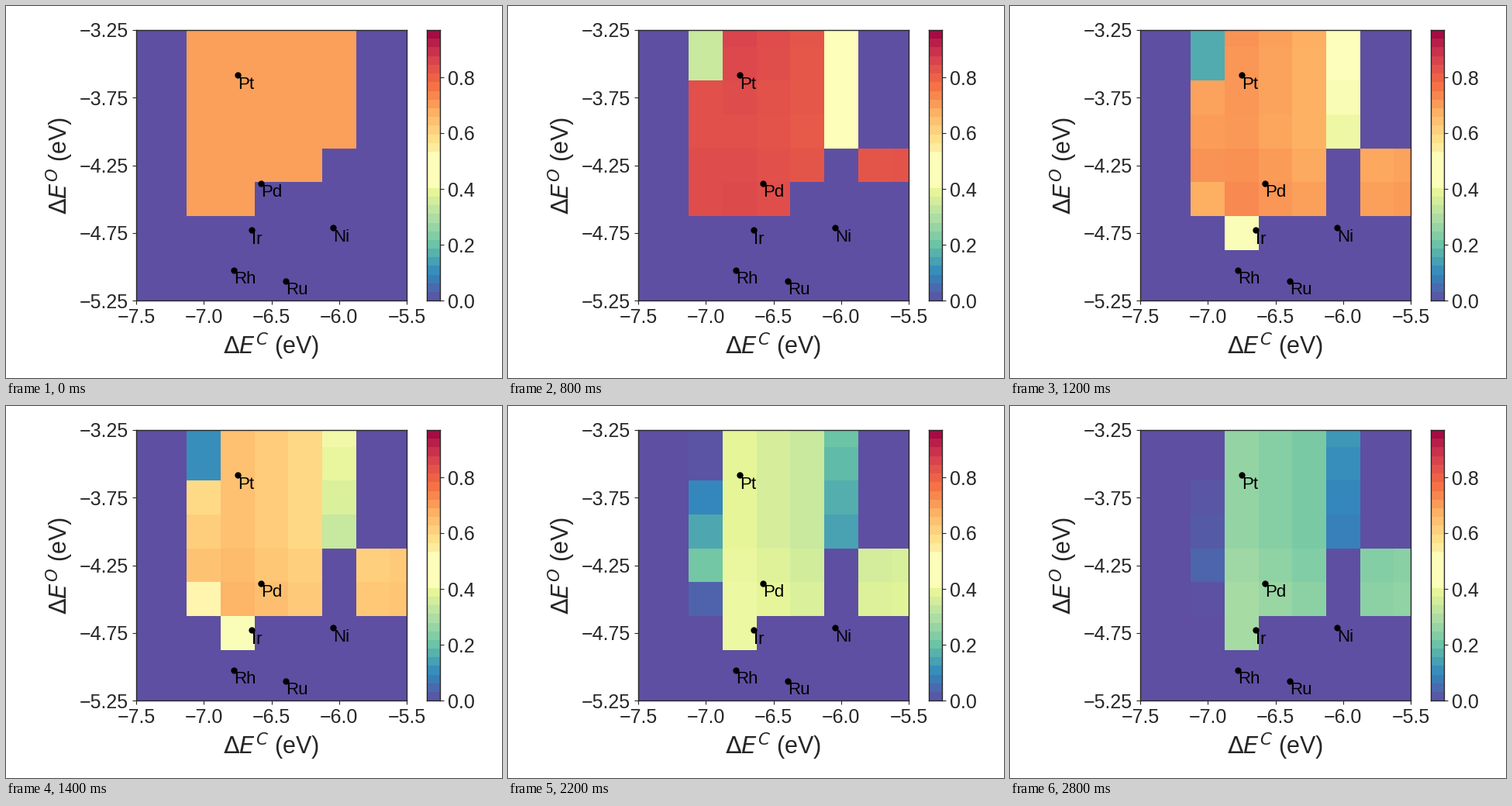
Animation of 640x480 px, one loop 3 s. Source, as a matplotlib script:

```python
import numpy as np
import matplotlib.pyplot as plt
from matplotlib.animation import FuncAnimation

W, H, DPI = 640, 480, 100
FRAMES, STEP = 15, 200
SIDE = 349
VMAX = SIDE / 360
INK = "0.15"

plt.rcParams.update({
    "font.family": "Liberation Sans",
    "axes.edgecolor": INK,
    "axes.labelcolor": INK,
    "xtick.color": INK,
    "ytick.color": INK,
    "xtick.labelsize": 18,
    "ytick.labelsize": 18,
    "axes.labelsize": 22,
    "axes.linewidth": 1.0,
})

METALS = [
    ("Pt", -6.748, -3.585), ("Pd", -6.575, -4.382), ("Ir", -6.644, -4.731),
    ("Ni", -6.042, -4.714), ("Rh", -6.776, -5.024), ("Ru", -6.392, -5.104),
]

ROW, COL = np.mgrid[:7, :7]


def half_life():
    """Time at which each cell has lost half of its coverage."""
    life = np.where(COL < 4, 10 - 0.4 * np.maximum(COL, 1), 8.1 + 0.15 * COL)
    life += 0.25 * np.clip(ROW - 3, 0, 2)
    life = np.where(COL == 4, 6.6 - 0.35 * ROW, life)
    return np.where((COL == 0) & (ROW < 2), 3.2, life)


LIFE = half_life()
# The left column collapses early, last of all in its fourth row
CUTOFF = np.where(COL == 0, np.interp(ROW, [2, 4, 5], [9.6, 11.2, 8.2]), np.inf)


def active(frame):
    if frame == 0:
        depth = np.array([6, 6, 5, 5, 4, 0, 0])
    else:
        depth = np.array([6, 6, 6, 5, 4, 5, 5])
        if frame >= 6:
            depth[[1, 3, 5, 6]] += 1
    return (ROW < depth) & ((COL < 5) | (ROW > 3))


def coverage(frame):
    if frame == 0:
        level = np.full((7, 7), 0.72)
    else:
        level = 0.96 / (1 + (frame / LIFE) ** 2.5)
        level /= 1 + (frame / CUTOFF) ** 8
        lift = np.clip(3 - ROW, 0, 3) * np.clip(4 - COL, 0, 3) * (COL > 0)
        level += 0.008 * lift * np.exp((2 - frame) / 1.7)
        cap = np.where(COL == 4, min(0.49, 0.32 + 0.042 * frame), 1)
        level = np.minimum(level, np.where(ROW == 6, 0.48, cap))
    return level * active(frame) * VMAX


def pixel_axes(x, y, w, h):
    return fig.add_axes([x / W, 1 - (y + h) / H, w / W, h / H])


fig = plt.figure(figsize=(W / DPI, H / DPI), dpi=DPI, facecolor="white")
cmap = plt.get_cmap("Spectral_r")
scale = dict(cmap=cmap, vmin=0, vmax=VMAX)

ax = pixel_axes(168, 31, SIDE, SIDE)
ax.set_facecolor(cmap(0.0))
x_edges = -7.125 + 0.25 * np.arange(8)
y_edges = -3.125 - 0.25 * np.arange(8)
mesh = ax.pcolormesh(x_edges, y_edges, coverage(0), **scale)
ax.set(xlim=(-7.5, -5.5), ylim=(-5.25, -3.25),
       xticks=np.arange(-7.5, -5.4, 0.5), yticks=np.arange(-5.25, -3.2, 0.5),
       xlabel=r"$\Delta E^C$ (eV)", ylabel=r"$\Delta E^O$ (eV)")
ax.xaxis.set_major_formatter("{x:.1f}")
ax.yaxis.set_major_formatter("{x:.2f}")

for name, x, y in METALS:
    ax.plot(x, y, "o", color="black", ms=6, mew=0, zorder=3)
    ax.annotate(name, (x, y), xytext=(0, -1), textcoords="offset points",
                color="black", fontsize=16, ha="left", va="top", zorder=4)

# Colour scale: narrow bands around one wide pale band
bar = pixel_axes(543, 31, 17, SIDE)
bands = np.append(np.linspace(0, 145, 14), np.linspace(192, SIDE, 15)) / 360
middles = (bands[:-1] + bands[1:]) / 2
bar.pcolormesh([0, 1], bands, middles[:, None], **scale)
bar.set(xlim=(0, 1), ylim=(0, VMAX), xticks=[], yticks=np.arange(0, 0.9, 0.2))
bar.yaxis.tick_right()
bar.yaxis.set_major_formatter("{x:.1f}")


def update(frame):
    mesh.set_array(coverage(frame))
    return [mesh]


def reset():
    return update(0)


anim = FuncAnimation(fig, update, frames=FRAMES, init_func=reset,
                     interval=STEP, repeat=True, repeat_delay=0)
plt.show()
```
